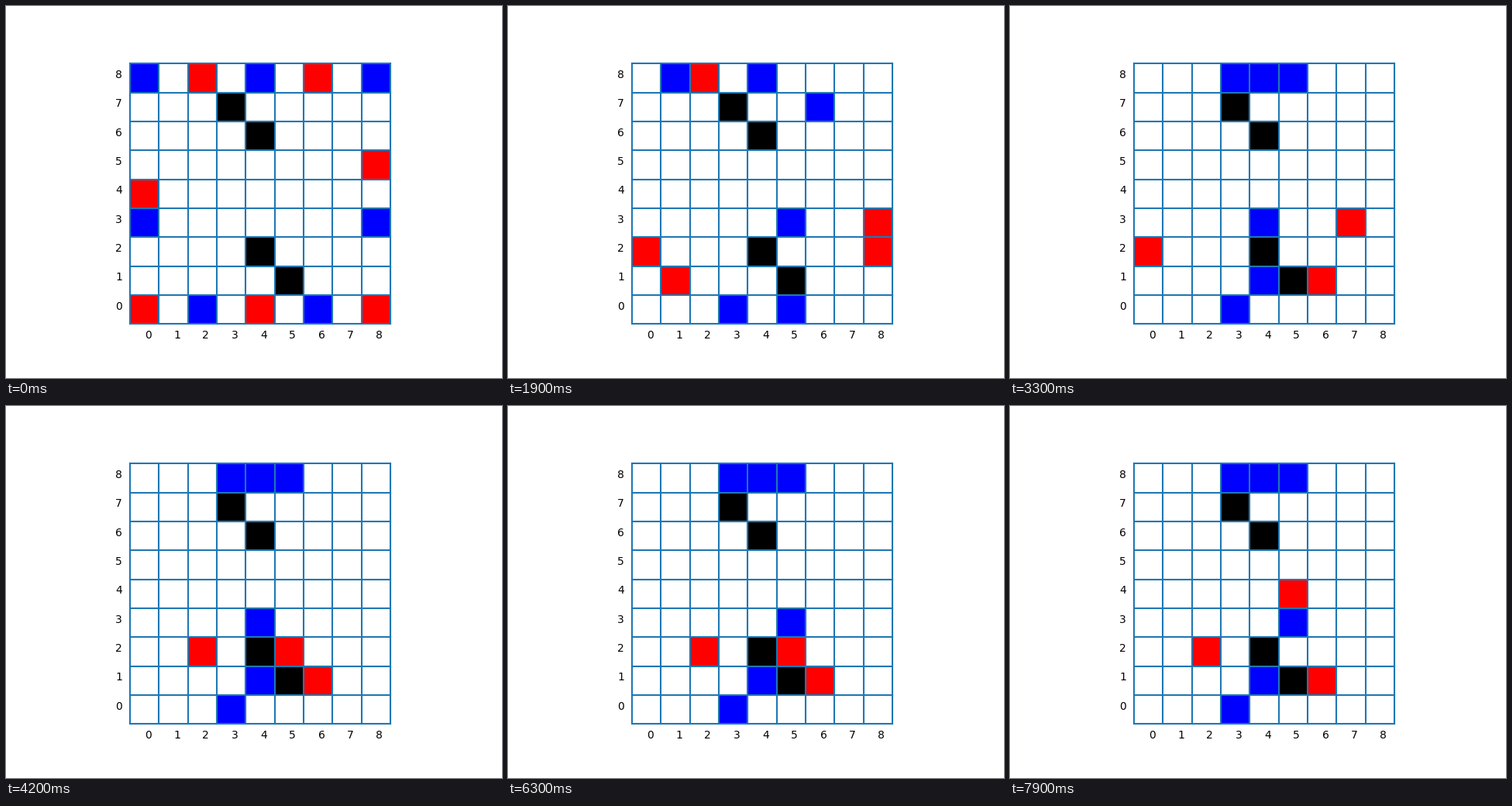
Animation of 640 by 480 pixels, one loop 8000 ms. Source, as a matplotlib script:

```python
import matplotlib.pyplot as plt
from matplotlib.animation import FuncAnimation
from matplotlib.patches import Rectangle

SIZE = 9
STEPS = {"L": (-1, 0), "R": (1, 0), "U": (0, 1), "D": (0, -1)}

walls = [(3, 7), (4, 6), (4, 2), (5, 1)]
blue = [(0, 8), (4, 8), (8, 8), (0, 3), (8, 3), (2, 0), (6, 0)]
red = [(2, 8), (6, 8), (8, 5), (0, 4), (0, 0), (4, 0), (8, 0)]

# Each move is the column and row of a piece plus a direction.
pace = "43R 22L 53L 12R "
moves = (
    "60L 80U 20R 81U 83L 85D 73L 84D 63L 68L 08R "
    "00U 03D 04D 88L 03D 78L 01R 68D "
    "28R 18R 11R 28R 21R 67L 83L 57U 82L 50L 72L 40U 62D 53L "
    "73L 43R 63D 53L 62L 43R 02R 53L 12R "
    + pace * 6
    + "43R 22L 53L 12R 43R 22L 53L "
    "52U 30R 12R 40L 53U 43R 22L 53L 12R 43R"
).split()


def neighbours(cell):
    return [(cell[0] + dx, cell[1] + dy) for dx, dy in STEPS.values()]


def play(board, move):
    """Move one piece a cell; enemies touched by two pieces are taken."""
    board = dict(board)
    cell = int(move[0]), int(move[1])
    dx, dy = STEPS[move[2]]
    side = board.pop(cell)
    board[cell[0] + dx, cell[1] + dy] = side
    enemy = "red" if side == "blue" else "blue"
    taken = [
        c for c, colour in board.items()
        if colour == enemy
        and sum(board.get(n) == side for n in neighbours(c)) >= 2
    ]
    for c in taken:
        del board[c]
    return board


boards = [{
    **dict.fromkeys(walls, "black"),
    **dict.fromkeys(blue, "blue"),
    **dict.fromkeys(red, "red"),
}]
for move in moves:
    boards.append(play(boards[-1], move))
boards = boards[:80]

fig, ax = plt.subplots(figsize=(6.4, 4.8), dpi=100)
ax.set_aspect("equal")
ax.axis("off")

for i in range(SIZE + 1):
    ax.plot([0, SIZE], [i, i], color="C0", lw=1.5)
    ax.plot([i, i], [0, SIZE], color="C0", lw=1.5)
for i in range(SIZE):
    ax.text(i + 0.5, -0.5, str(i), fontsize=10)
    ax.text(-0.5, i + 0.5, str(i), fontsize=10)

tiles = {
    (x, y): ax.add_patch(Rectangle((x, y), 1, 1, lw=0, fc="white"))
    for x in range(SIZE) for y in range(SIZE)
}
ax.set_xlim(-0.45, 9.45)
ax.set_ylim(-0.45, 9.45)


def update(frame):
    for cell, tile in tiles.items():
        tile.set_facecolor(boards[frame].get(cell, "white"))
    return list(tiles.values())


anim = FuncAnimation(fig, update, frames=len(boards), interval=100,
                     repeat=True, repeat_delay=0, blit=False)
plt.show()
```
